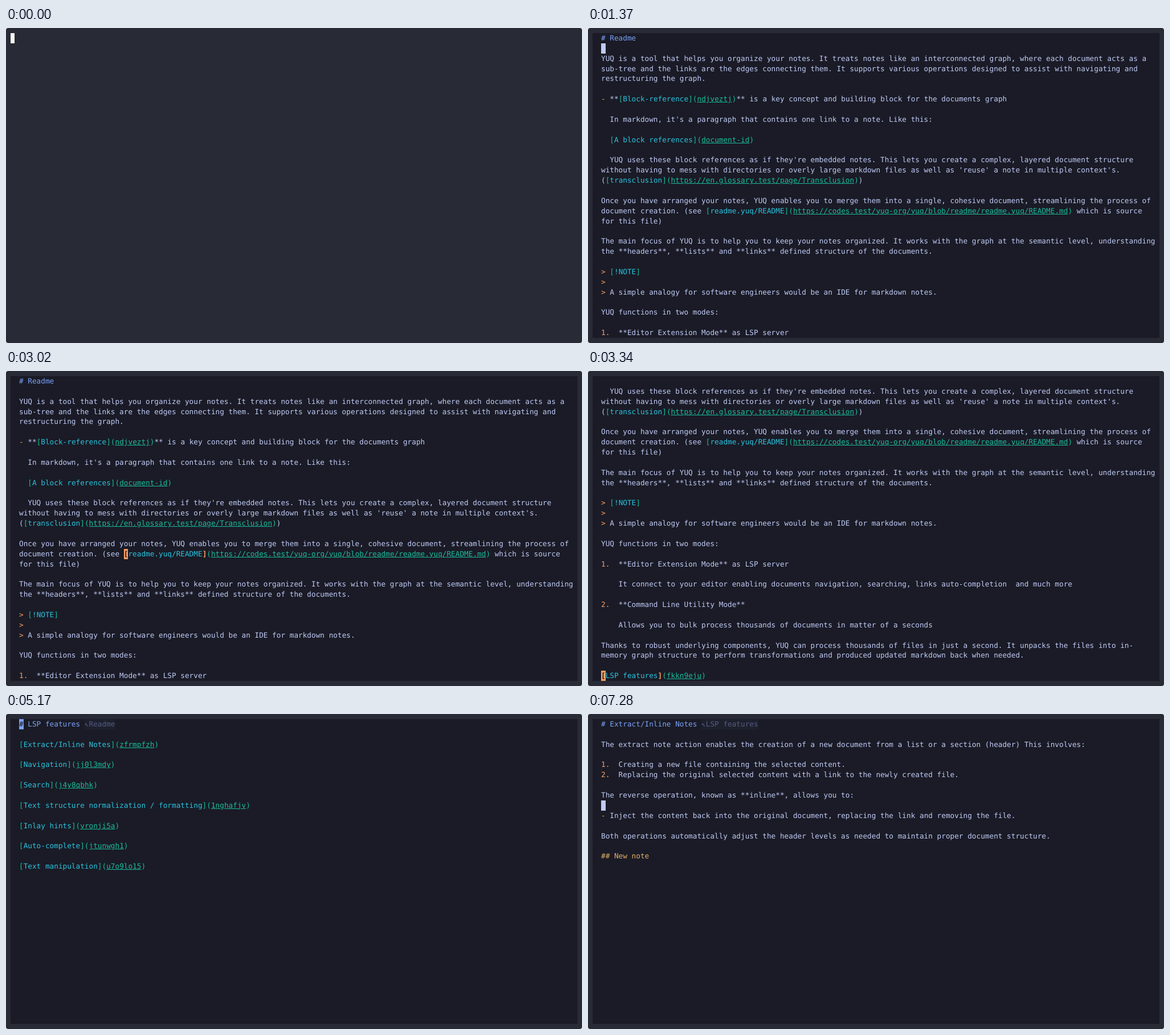
An HTML page for the animation above (8000 ms loop, 1011 by 554 pixels).

```html
<!DOCTYPE html>
<html lang="en">
<head>
<meta charset="utf-8">
<title>Notes in a terminal editor</title>
<style>
  :root {
    --cw: calc(1011px / 132);
    --rh: calc(554px / 31);
    --frame: #282a36;
    --bg: #1a1b26;
    --fg: #c0caf5;
  }
  html, body {
    margin: 0;
    width: 100%;
    height: 100%;
    overflow: hidden;
    background: #fff;
  }
  #stage {
    position: relative;
    width: 1011px;
    height: 554px;
    border-radius: 4px;
    background: var(--frame);
    overflow: hidden;
    font: 12.722px/var(--rh) "DejaVu Sans Mono", "Noto Sans Mono", monospace;
    font-variant-ligatures: none;
    font-kerning: none;
    text-rendering: geometricPrecision;
    color: var(--fg);
  }
  #screen {
    position: absolute;
    left: var(--cw);
    top: calc(var(--rh) / 2);
    width: calc(var(--cw) * 130);
    height: calc(var(--rh) * 30);
    background: var(--bg);
  }
  #screen.blank { background: none; }
  .row, .cell {
    position: absolute;
    height: var(--rh);
    white-space: pre;
  }
  .row {
    left: calc(var(--cw) * 2);
    top: calc(var(--rh) * var(--r));
  }
  .cell {
    left: calc(var(--cw) * (var(--c) + 2));
    top: calc(var(--rh) * var(--r));
    width: var(--cw);
    background: var(--bg);
  }
  #cursor { background: currentColor; }
  #cursor span { color: var(--bg); }
  .h1 { color: #7aa2f7; }
  .h2 { color: #e0af68; }
  .mark { color: #ff9e64; }
  .link { color: #1abc9c; }
  .label { color: #2ac3de; }
  .url { color: #1abc9c; text-decoration: underline; }
  .hint { display: inline-block; height: var(--rh); color: #545c7e; background: #1d202d; }
  .match { color: #ff9e64; font-weight: bold; }
  .shell { color: #f8f8f2; }
</style>
</head>
<body>
<div id="stage">
  <div id="screen">
    <div id="text"></div>
    <div id="match" class="cell match"></div>
    <div id="cursor" class="cell"><span></span></div>
  </div>
</div>
<script>
const LOOP = 8000, ROWS = 30;

const readme = `# Readme

YUQ is a tool that helps you organize your notes. It treats notes like an interconnected graph, where each document acts as a
sub-tree and the links are the edges connecting them. It supports various operations designed to assist with navigating and
restructuring the graph.

- **[Block-reference](ndjveztj)** is a key concept and building block for the documents graph

  In markdown, it's a paragraph that contains one link to a note. Like this:

  [A block references](document-id)

  YUQ uses these block references as if they're embedded notes. This lets you create a complex, layered document structure
without having to mess with directories or overly large markdown files as well as 'reuse' a note in multiple context's.
([transclusion](https://en.glossary.test/page/Transclusion))

Once you have arranged your notes, YUQ enables you to merge them into a single, cohesive document, streamlining the process of
document creation. (see [readme.yuq/README](https://codes.test/yuq-org/yuq/blob/readme/readme.yuq/README.md) which is source
for this file)

The main focus of YUQ is to help you to keep your notes organized. It works with the graph at the semantic level, understanding
the **headers**, **lists** and **links** defined structure of the documents.

> [!NOTE]
>
> A simple analogy for software engineers would be an IDE for markdown notes.

YUQ functions in two modes:

1.  **Editor Extension Mode** as LSP server

    It connect to your editor enabling documents navigation, searching, links auto-completion  and much more

2.  **Command Line Utility Mode**

    Allows you to bulk process thousands of documents in matter of a seconds

Thanks to robust underlying components, YUQ can process thousands of files in just a second. It unpacks the files into in-
memory graph structure to perform transformations and produced updated markdown back when needed.

[LSP features](fkkn9eju)`.split('\n');

const features = `# LSP features ↖Readme

[Extract/Inline Notes](zfrmpfzh)

[Navigation](jj0l3mdy)

[Search](j4y8qbhk)

[Text structure normalization / formatting](1nghafjv)

[Inlay hints](vronji5a)

[Auto-complete](jtunwgh1)

[Text manipulation](u7o9lo15)`.split('\n');

const extract = `# Extract/Inline Notes ↖LSP features

The extract note action enables the creation of a new document from a list or a section (header) This involves:

1.  Creating a new file containing the selected content.
2.  Replacing the original selected content with a link to the newly created file.

The reverse operation, known as **inline**, allows you to:

- Inject the content back into the original document, replacing the link and removing the file.

Both operations automatically adjust the header levels as needed to maintain proper document structure.

## New note`.split('\n');

const views = {
  blank: [],
  top: readme.slice(0, ROWS),
  end: readme.slice(-ROWS),
  opening: [features[0].split('↖')[0], ...features.slice(1)],
  features,
  extract
};

// start time, view, cursor row, cursor column
const steps = [
  [0, 'blank', 0, -2],
  [120, 'top', 0, 0],
  [1370, 'top', 1, 0],
  [1620, 'top', 2, 0],
  [1660, 'top', 3, 0],
  [1700, 'top', 4, 0],
  [1750, 'top', 6, 0],
  [1790, 'top', 7, 0],
  [2270, 'top', 10, 2],
  [2670, 'top', 14, 1],
  [3020, 'top', 17, 24],
  [3340, 'end', 29, 0],
  [5120, 'opening', 0, 0],
  [5170, 'features', 0, 0],
  [5800, 'features', 1, 0],
  [6010, 'features', 2, 0],
  [6410, 'extract', 0, 0],
  [6710, 'extract', 1, 0],
  [6890, 'extract', 2, 0],
  [7140, 'extract', 3, 0],
  [7190, 'extract', 4, 0],
  [7240, 'extract', 6, 0],
  [7280, 'extract', 8, 0]
];

const $ = id => document.getElementById(id);
const screen_ = $('screen'), text = $('text'), cursor = $('cursor'), match = $('match');

// Splits a markdown line into [text, class] parts.
function highlight(line) {
  const token = /(^# [^↖]*)|(^## .*)|(^(?:-|>|\d\.)(?= |$))|(↖.*)|\[([^\]]+)\](?:\(([^)]+)\))?/g;
  const parts = [];
  let last = 0;
  for (const m of line.matchAll(token)) {
    const [all, h1, h2, mark, hint, label, url] = m;
    parts.push([line.slice(last, m.index), '']);
    if (label) {
      parts.push(['[', 'link'], [label, 'label'], [']', 'link']);
      if (url) parts.push(['(', 'link'], [url, 'url'], [')', 'link']);
    } else {
      parts.push([all, h1 ? 'h1' : h2 ? 'h2' : mark ? 'mark' : 'hint']);
    }
    last = m.index + all.length;
  }
  parts.push([line.slice(last), '']);
  return parts.filter(([s]) => s);
}

function classAt(line, col) {
  for (const [s, cls] of highlight(line)) {
    if (col < s.length) return cls;
    col -= s.length;
  }
  return '';
}

function place(el, row, col) {
  el.style.setProperty('--r', row);
  el.style.setProperty('--c', col);
}

function drawText(view) {
  screen_.className = view;
  text.replaceChildren(...views[view].map((line, r) => {
    const row = document.createElement('div');
    row.className = 'row';
    row.style.setProperty('--r', r);
    for (const [s, cls] of highlight(line)) {
      const span = document.createElement('span');
      span.className = cls;
      span.textContent = s;
      row.append(span);
    }
    return row;
  }));
}

function drawCursor(view, row, col) {
  const line = views[view][row] || '';
  const char = line[col] || '';
  const close = char === '[' ? line.indexOf(']', col) : -1;
  const cls = view === 'blank' ? 'shell' : close > 0 ? 'match' : classAt(line, col);
  cursor.className = 'cell ' + cls;
  cursor.firstChild.textContent = char;
  place(cursor, row, col);
  match.hidden = close < 0;
  match.textContent = close < 0 ? '' : ']';
  match.style.display = close < 0 ? 'none' : '';
  place(match, row, close);
}

let shown = null, shownView = null;

function tick() {
  const t = performance.now() % LOOP;
  const step = steps.findLast(s => s[0] <= t);
  if (step !== shown) {
    const [, view, row, col] = step;
    if (view !== shownView) drawText(view);
    drawCursor(view, row, col);
    shown = step;
    shownView = view;
  }
  requestAnimationFrame(tick);
}
tick();
</script>
</body>
</html>
```
